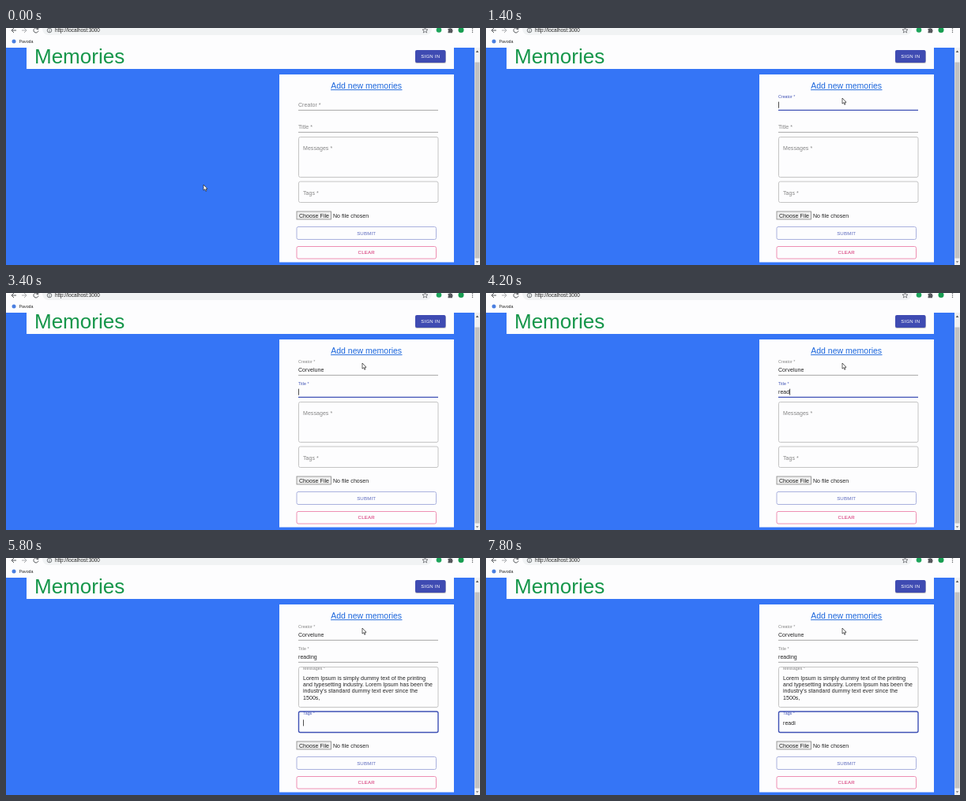
An HTML page that plays this animation: 600 by 301 pixels, repeating every 8 s.

```html
<!DOCTYPE html>
<html lang="en">
<head>
<meta charset="utf-8">
<title>Add new memories</title>
<style>
  html, body { margin: 0; width: 100%; height: 100%; overflow: hidden; background: #3575f6; }
  svg { display: block; width: 600px; height: 301px; }
  text { font: 7px "Liberation Sans", Arial, sans-serif; letter-spacing: .066px; fill: #222; white-space: pre; }
  .title { font-size: 26px; letter-spacing: 0; fill: #16964a; }
  .heading { font-size: 10.5px; letter-spacing: 0; fill: #1b66dc; text-anchor: middle; }
  .btn { font-size: 6.125px; letter-spacing: .175px; text-anchor: middle; }
  .label { fill: #858585; }
  .label.small { font-size: 5.25px; letter-spacing: .05px; }
  .edge { fill: none; stroke: #c4c4c4; }
  .underline { stroke: #949494; stroke-width: .8; }
  .focus .label { fill: #3f51b5; }
  .focus .edge { stroke: #3f51b5; stroke-width: 1.4; }
  .focus .underline { stroke: #3f51b5; stroke-width: 1.1; }
  .icon { fill: none; stroke: #55585c; stroke-width: 1; }
</style>
</head>
<body>
<svg viewBox="0 0 600 301">
  <rect width="600" height="301" fill="#3575f6"/>

  <!-- browser bars -->
  <rect width="600" height="25" fill="#fdfdfe"/>
  <rect x="46" y="-8" width="493" height="17" rx="8" fill="#f1f3f4"/>
  <g class="icon">
    <path d="M13 3H7M10 0L7 3L10 6"/>
    <path d="M20 3H26M23 0L26 3L23 6" stroke="#a9abae"/>
    <path d="M40 .8A3 3 0 1 0 40.9 3.5M41 -1V1.5H38.5"/>
    <circle cx="55" cy="3" r="2.8" stroke-width=".8"/>
    <path d="M55 2.6V4.8M55 1V1.8" stroke-width=".8"/>
    <path d="M530.500 -.5L531.400 1.900L534 2L532 3.600L532.700 6L530.500 4.600L528.300 6L529 3.600L527 2L529.600 1.900Z" stroke-width=".7"/>
  </g>
  <circle cx="548" cy="2.500" r="3.300" fill="#1ea45c"/>
  <path d="M559.500 0.800h1.700a1.200 1.200 0 0 1 2.200 0h1.600v1.700a1.200 1.200 0 0 1 0 2.200v1.500h-5.500v-1.700a1.100 1.100 0 0 0 0 -2z" fill="#55585c"/>
  <circle cx="576" cy="2.500" r="3.500" fill="#179c50"/>
  <g fill="#55585c"><circle cx="590.500" cy=".4" r=".7"/><circle cx="590.500" cy="2.800" r=".7"/><circle cx="590.500" cy="5.200" r=".7"/></g>
  <text x="62" y="5.300" style="font-size:6.350px;letter-spacing:0" fill="#333">http://localhost:3000</text>
  <circle cx="10" cy="17" r="2.500" fill="#4a7fe0"/>
  <text x="16.500" y="19" style="font-size:5.300px;letter-spacing:0">Pavoda</text>

  <!-- page scrollbar -->
  <rect x="593" y="25" width="7" height="276" fill="#f1f1f1"/>
  <rect x="593.500" y="43.500" width="6" height="249" fill="#c1c1c1"/>
  <path d="M594.700 31L596.500 28.500L598.300 31Z" fill="#555"/>
  <path d="M594.700 296L596.500 298.500L598.300 296Z" fill="#8a8a8a"/>

  <!-- header -->
  <rect x="26" y="25" width="541" height="27" fill="#fdfdfe"/>
  <text class="title" x="36" y="45">Memories</text>
  <rect x="518" y="29" width="39" height="16" rx="2" fill="#000" opacity=".22"/>
  <rect x="518" y="28" width="38.500" height="16" rx="2" fill="#3f4bb2"/>
  <text class="btn" x="537.300" y="38.200" style="fill:#fff">SIGN IN</text>

  <!-- form -->
  <rect x="346" y="59" width="221" height="238.500" fill="#fdfdfe"/>
  <text class="heading" x="456.200" y="76.500">Add new memories</text>
  <path d="M411 78.500H501.500" stroke="#1b66dc" stroke-width=".9"/>
  <g id="fields"></g>
  <rect x="368" y="233" width="43.500" height="10" fill="#efefef" stroke="#858585" stroke-width=".8"/>
  <text x="371" y="240.500">Choose File</text>
  <text x="414" y="240.500">No file chosen</text>
  <rect x="368" y="252.500" width="176.500" height="16" rx="2" fill="none" stroke="#a9b1de"/>
  <text class="btn" x="456.200" y="262.700" style="fill:#5a68bd">SUBMIT</text>
  <rect x="368" y="277.500" width="176.500" height="15.500" rx="2" fill="none" stroke="#ee8fb3"/>
  <text class="btn" x="456.200" y="287.300" style="fill:#d3246b">CLEAR</text>

  <path id="pointer" d="M0 0V7.200L1.700 5.700L2.800 8.300L4 7.800L2.900 5.300H5Z" fill="#fff" stroke="#222" stroke-width=".7"/>
</svg>
<script>
const LOOP = 8000, STEP = 200, LINE = 8.3;
const svg = document.querySelector('svg');
const pointer = document.getElementById('pointer');

function add(parent, tag, attrs) {
  const el = document.createElementNS(svg.namespaceURI, tag);
  for (const key in attrs) el.setAttribute(key, attrs[key]);
  return parent.appendChild(el);
}

function makeField({ name, x, base, small, box }) {
  const group = add(document.getElementById('fields'), 'g', {});
  const label = add(group, 'text', { x });
  label.textContent = name + ' *';
  if (box) add(group, 'rect', { class: 'edge', x: 370.5, y: box[0], width: 176.5, height: box[1], rx: 2 });
  else add(group, 'path', { class: 'underline', d: `M370 ${base + 4.4}H547` });
  const lines = [0, 1, 2, 3].map(i => add(group, 'text', { x, y: base + i * LINE }));
  const caret = add(group, 'rect', { width: .8, height: 8, fill: '#222' });

  return (value, focused, caretOn) => {
    const shrunk = focused || value;
    group.setAttribute('class', focused ? 'focus' : '');
    label.setAttribute('class', shrunk ? 'label small' : 'label');
    label.setAttribute('y', shrunk ? small : base);
    const rows = value.split('\n');
    lines.forEach((line, i) => line.textContent = rows[i] || '');
    const last = rows.length - 1;
    caret.setAttribute('visibility', focused && caretOn ? 'visible' : 'hidden');
    caret.setAttribute('x', x + (rows[last] ? lines[last].getComputedTextLength() : .2));
    caret.setAttribute('y', base + last * LINE - 6.3);
  };
}

const fields = [
  { name: 'Creator', x: 370, base: 100, small: 88.5 },
  { name: 'Title', x: 370, base: 128, small: 116.7 },
  { name: 'Messages', x: 376, base: 154.7, small: 141.7, box: [138.5, 51] },
  { name: 'Tags', x: 376, base: 211.7, small: 198.7, box: [195, 26.5] }
].map(makeField);

const message = `Lorem Ipsum is simply dummy text of the printing
and typesetting industry. Lorem Ipsum has been the
industry's standard dummy text ever since the
1500s,`;

// Each entry: time, field index, value from then on
const edits = [[1000, 0, '']];
function type(field, start, text) {
  [...text].forEach((_, i) => edits.push([start + i * STEP, field, text.slice(0, i + 1)]));
}
type(0, 1600, 'Corvelun');
edits.push([3000, 0, 'Corvelune'], [3200, 1, '']);
type(1, 3600, 'reading');
edits.push([5000, 2, ''], [5400, 2, message], [5800, 3, '']);
type(3, 6400, 'readi');

const path = [[0, 250, 199], [200, 250, 199], [400, 288, 181], [600, 368, 136], [800, 436, 98], [1000, 451, 89]];

function draw(t) {
  const past = edits.filter(e => e[0] <= t);
  const values = ['', '', '', ''];
  past.forEach(([, field, value]) => values[field] = value);
  const [since, active] = past[past.length - 1] || [0, -1];
  const caretOn = (t - since) % 1060 < 530;
  fields.forEach((update, i) => update(values[i], i === active, caretOn));
  const [, x, y] = path.filter(p => p[0] <= t).pop();
  pointer.setAttribute('transform', `translate(${x} ${y})`);
}

let shown = -1;
function tick() {
  const t = Math.floor(performance.now() % LOOP / STEP) * STEP;
  if (t !== shown) draw(shown = t);
  requestAnimationFrame(tick);
}
tick();
</script>
</body>
</html>
```
